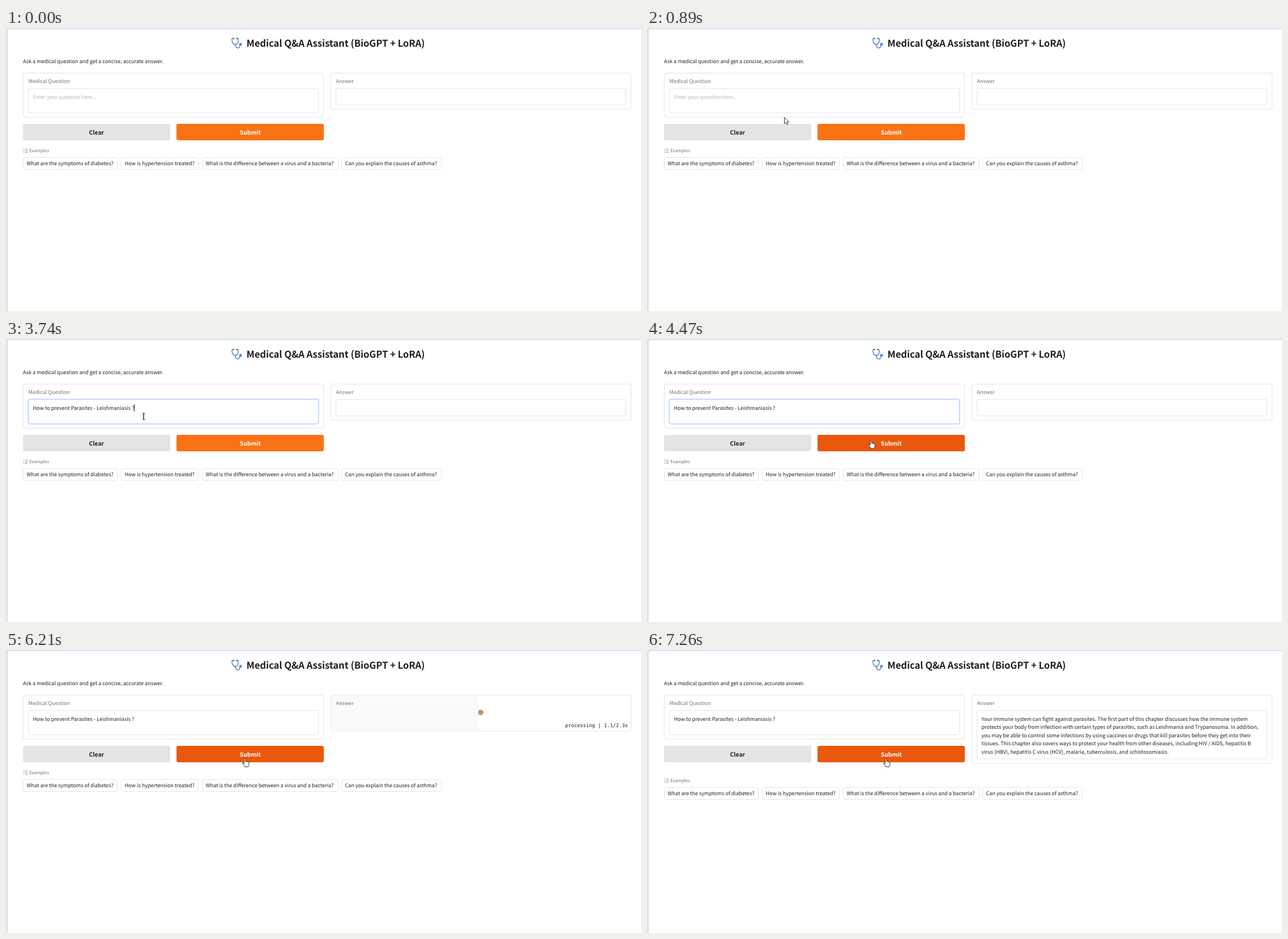
These frames come from a looping animation (1121 by 499 pixels, 8 s). An HTML page:

```html
<!DOCTYPE html>
<html lang="en">
<head>
<meta charset="utf-8">
<title>Medical Q&amp;A Assistant</title>
<style>
html, body { margin: 0; width: 100%; height: 100%; overflow: hidden; background: #d8e2ec; }
svg { display: block; }
text { font: 9.11px "Noto Sans CJK JP", "Noto Sans CJK SC", "Noto Sans CJK", sans-serif; fill: #202024; text-rendering: geometricPrecision; white-space: pre; }
.title { font-size: 16.7px; font-weight: 600; letter-spacing: -.07px; }
.label { fill: #71717a; }
.hint { fill: #b4b4bc; }
.small { font-size: 7.8px; fill: #71717a; }
.button { font-size: 10.3px; font-weight: 600; text-anchor: middle; }
.mono { font: 8.75px "DejaVu Sans Mono", monospace; text-anchor: end; }
.box { fill: #fff; stroke: #e4e4e7; }
</style>
</head>
<body>
<svg width="1121" height="499" viewBox="0 0 1121 499">
  <path d="M3 499V7q0-5 5-5H1121V499z" fill="#fff"/>

  <g fill="none" stroke-linecap="round">
    <path d="M402 18.5h-2q-1.2 0-1.1 2c.3 5 2 8.5 5.8 8.5s5.3-3.5 5.5-8.5q.1-2-1.2-2h-1.5" stroke="#4f88b8" stroke-width="1.5"/>
    <path d="M404.7 29c.3 4 2 6.200 4.800 6.200c3 0 3.200-2.500 3.400-4.500" stroke="#6d6f9c" stroke-width="1.5"/>
    <path d="M402 17.800v1.500M407.300 17.800v1.500" stroke="#45484f" stroke-width="1.4"/>
    <circle cx="414" cy="28.800" r="2.300" fill="#2f86d6" stroke="#74aee4"/>
  </g>
  <text class="title" x="424.5" y="33">Medical Q&amp;A Assistant (BioGPT + LoRA)</text>
  <text x="30" y="62">Ask a medical question and get a concise, accurate answer.</text>

  <rect class="box" x="30.5" y="79.5" width="530" height="77.5" rx="2.5"/>
  <text class="label" x="39.5" y="97">Medical Question</text>
  <rect id="ring" x="38.5" y="105.5" width="514" height="45" rx="4" fill="none" stroke="#e6f0fd" stroke-width="2"/>
  <rect id="field" class="box" x="39.5" y="106.5" width="512" height="43" rx="2.5"/>
  <text id="question" x="47.5" y="125"></text>
  <path id="caret" stroke="#18181b"/>

  <rect id="panel" class="box" x="573.5" y="79.5" width="530" rx="2.5"/>
  <rect id="progress" x="574" y="80" height="63" fill="#fafafa"/>
  <text class="label" x="582.5" y="97">Answer</text>
  <rect id="output" class="box" x="582.5" y="106.5" width="512" rx="2.5"/>
  <g id="answer"></g>
  <g id="status">
    <circle cx="838" cy="110" r="4.8" fill="#bd9470"/>
    <text id="timer" class="mono" x="1097.8" y="136"></text>
  </g>

  <rect x="30" y="169" width="260" height="29" rx="3" fill="#e4e4e7"/>
  <text class="button" x="159.8" y="188">Clear</text>
  <rect id="submit" x="301" y="169" width="260" height="29" rx="3"/>
  <text class="button" x="431.3" y="188" style="fill:#fff">Submit</text>

  <g id="examples">
    <path d="M30.5 213.5h1.5m1.5 0h4.5M30.5 216.5h1.5m1.5 0h4.5M30.5 219.5h1.5m1.5 0h4.5" stroke="#8b8b94"/>
    <text class="small" x="41.3" y="219">Examples</text>
  </g>

  <circle id="click" r="8" fill="#facc15" opacity=".75"/>
  <g id="cursor" stroke-linejoin="round">
    <path id="arrow" d="M.5 .5V11.8l2.7-2.5 1.8 4.2 1.9-.8-1.8-4.1h3.5z" fill="#fff" stroke="#222" stroke-width=".9"/>
    <path id="beam" d="M-2.5-5.5h2q.5 0 .5.5v10q0 .5-.5.5h-2M2.5-5.5h-2q-.5 0-.5.5v10q0 .5.5.5h2" fill="none" stroke="#222"/>
    <path id="hand" d="M-.5 2.500q0-1.500 1.200-1.500T1.900 2.500v4.200q1.700-.8 2.300.4q1.500-.6 2.100.6q1.700-.3 1.700 1.300v2.700q0 1.800-1.200 3v1.300H.7v-1.300L-3 11.100q-.9-1.400.2-2q.8-.4 2.300 1.400z" fill="#fff" stroke="#222" stroke-width=".95"/>
  </g>
</svg>
<script>
const $ = id => document.getElementById(id);
const set = (id, attrs) => { for (const k in attrs) $(id).setAttribute(k, attrs[k]); };
const show = (id, on) => { $(id).style.display = on ? '' : 'none'; };
const within = (v, a, b) => v >= a && v < b;

const LOOP = 8000, PRESS = 1270, PASTE = 3740, SUBMIT = 4960, START = 5080, DONE = 7250;
const ETA = 2.3;

const chips = [
  [30.5, 166, 'What are the symptoms of diabetes?'],
  [203.5, 136, 'How is hypertension treated?'],
  [346.5, 240, 'What is the difference between a virus and a bacteria?'],
  [592.5, 176, 'Can you explain the causes of asthma?']
];
$('examples').innerHTML += chips.map(([x, w, s], i) =>
  `<rect id="chip${i}" class="box" x="${x}" y="228.5" width="${w}" height="21" rx="3"/>
   <text x="${x + 6}" y="242">${s}</text>`).join('');

$('answer').innerHTML = [
  'Your immune system can fight against parasites. The first part of this chapter discusses how the immune system',
  'protects your body from infection with certain types of parasites, such as Leishmania and Trypanosoma. In addition,',
  'you may be able to control some infections by using vaccines or drugs that kill parasites before they get into their',
  'tissues. This chapter also covers ways to protect your health from other diseases, including HIV / AIDS, hepatitis B',
  'virus (HBV), hepatitis C virus (HCV), malaria, tuberculosis, and schistosomiasis.'
].map((s, i) => `<text x="590.5" y="${125 + i * 14.45}">${s}</text>`).join('');

// Pointer keys: time, x, y
const path = [
  [160, 806, 218], [220, 640, 370], [280, 330, 402], [340, 116, 248], [385, 114, 230],
  [390, 114, 217], [430, 114, 217], [600, 190, 112], [890, 242, 157],
  [1020, 242, 157], [1100, 243, 136.5],
  [4050, 243, 136.5], [4500, 405, 180], [4650, 425, 200], [4810, 421, 190]
];
function pointer(t) {
  const i = path.findIndex(k => k[0] > t);
  if (i < 0) return path[path.length - 1].slice(1);
  if (i === 0) return path[0].slice(1);
  const [t0, x0, y0] = path[i - 1], [t1, x1, y1] = path[i];
  const p = (t - t0) / (t1 - t0);
  return [x0 + (x1 - x0) * p, y0 + (y1 - y0) * p];
}
const chipAt = ([x, y]) => within(y, 228, 251) ? chips.findIndex(c => within(x, c[0], c[0] + c[1])) : -1;

function drawPointer(t) {
  const [x, y] = pointer(t);
  const overField = within(x, 39, 552) && within(y, 107, 150);
  const overRow = within(y, 169, 199);
  const overSubmit = overRow && within(x, 301, 561);
  const overButton = overSubmit || overRow && within(x, 30, 290) || chipAt([x, y]) >= 0;
  show('cursor', t >= 160);
  show('beam', overField);
  show('hand', overButton);
  show('arrow', !overField && !overButton);
  set('cursor', { transform: `translate(${x} ${y})` });
  set('submit', { fill: overSubmit ? '#ea580c' : '#f97316' });
  set('click', { cx: x, cy: y });
  show('click', within(t, PRESS, 1350) || within(t, SUBMIT, 5100));
  const hot = t > 160 ? chipAt(pointer(t - 45)) : -1;
  chips.forEach((c, i) => {
    $('chip' + i).style.fill = i === hot ? '#fff7ed' : '';
    $('chip' + i).style.stroke = i === hot ? '#fdba74' : '';
  });
}

function drawQuestion(t) {
  const focus = within(t, PRESS, SUBMIT), typed = t >= PASTE;
  show('ring', focus);
  $('field').style.stroke = focus ? '#a9c9f3' : '';
  $('question').textContent = typed ? 'How to prevent Parasites - Leishmaniasis ?' : 'Enter your question here...';
  $('question').setAttribute('class', typed ? '' : 'hint');
  const end = typed ? Math.floor(47.5 + $('question').getComputedTextLength()) : 47;
  set('caret', { d: `M${end + .5} 115v13` });
  show('caret', [[PRESS, 1860], [2380, 2870], [3430, 4240], [4740, SUBMIT]].some(([a, b]) => within(t, a, b)));
}

function drawAnswer(t) {
  const busy = within(t, START, DONE), done = t >= DONE;
  const sec = Math.max(0, (t - START) / 1000);
  set('panel', { height: done ? 120.5 : 63.5 });
  set('output', { height: done ? 85.5 : 29 });
  set('progress', { width: Math.min(1, sec / ETA) * 530 });
  show('progress', busy);
  show('status', busy);
  show('output', !busy);
  show('answer', done);
  $('timer').textContent = `processing | ${sec.toFixed(1)}/${ETA}s`;
  set('examples', { transform: `translate(0 ${done ? 14 : 0})` });
}

function frame() {
  const t = performance.now() % LOOP;
  drawPointer(t);
  drawQuestion(t);
  drawAnswer(t);
  requestAnimationFrame(frame);
}
frame();
</script>
</body>
</html>
```
